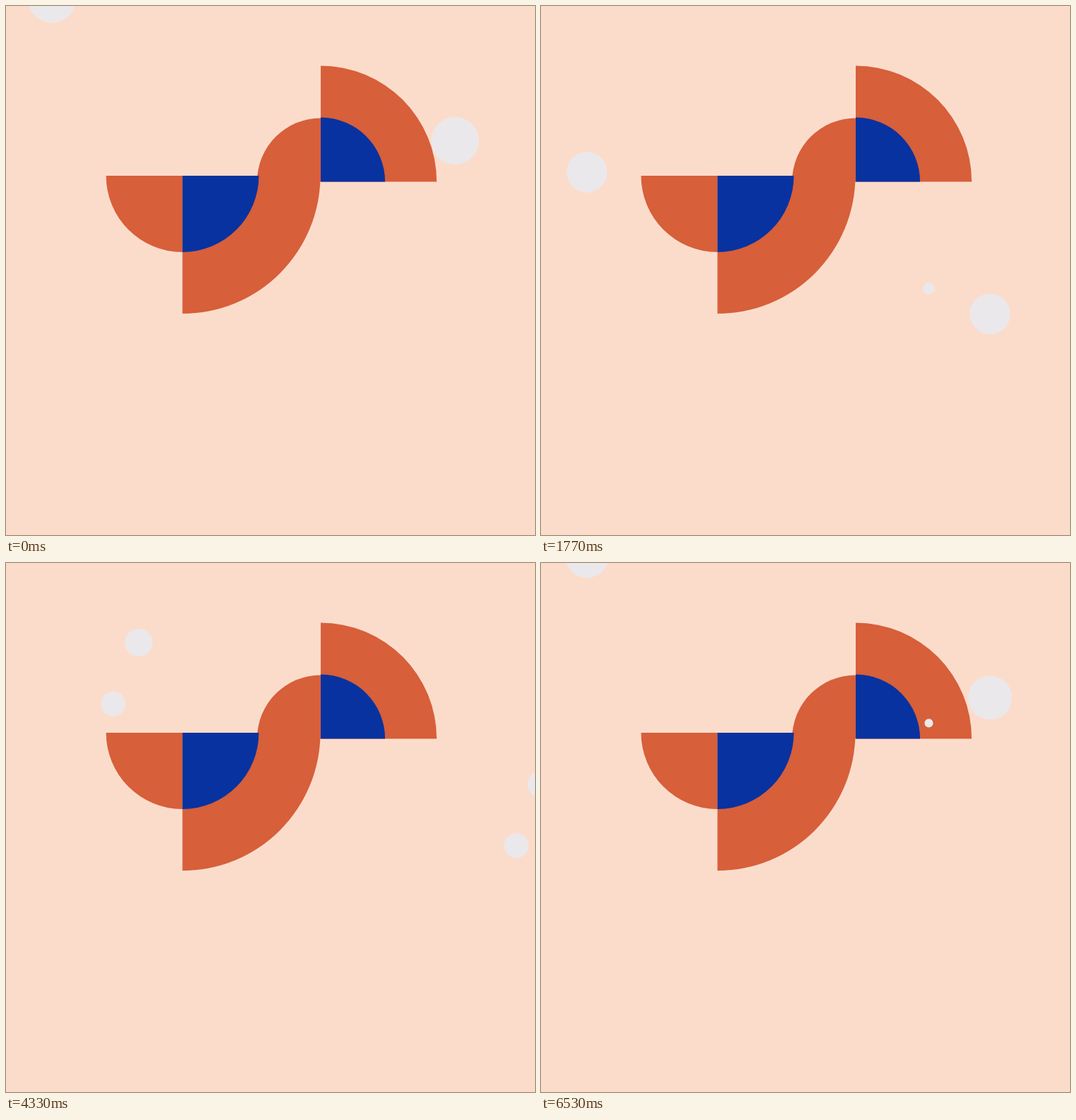
An HTML page with a canvas for the animation above (6560 ms loop, 748 by 748 pixels).

```html
<!DOCTYPE html>
<html lang="en">
<head>
<meta charset="utf-8">
<title>Pulsing rings</title>
<style>
html, body { margin: 0; width: 100%; height: 100%; overflow: hidden; background: #fbdccb; }
canvas { display: block; width: 748px; height: 748px; }
</style>
</head>
<body>
<canvas id="stage" width="748" height="748"></canvas>
<script>
const ctx = document.getElementById('stage').getContext('2d');
const LOOP = 6560, STEP = LOOP / 16, PEAK_AT = 38, MAX_R = 37, RING_R = 122.5;
const BG = '#fbdccb', ORANGE = '#d75f3a', BLUE = '#0832a0', DOT = '#ebe8eb';
const centers = [[65, 112.5], [635, 313]];

// Wedge spanning quarter turns, counted clockwise from the right
function wedge(x, y, r, from, to, color) {
  ctx.fillStyle = color;
  ctx.beginPath();
  ctx.moveTo(x, y);
  ctx.arc(x, y, r, from * Math.PI / 2, to * Math.PI / 2);
  ctx.fill();
}

function drawShapes() {
  wedge(445, 248.5, 90, 2, 3, ORANGE);
  wedge(249.5, 240, 195, 0, 1, ORANGE);
  wedge(249.5, 240, 108, 1, 2, ORANGE);
  wedge(249.5, 240, 108, 0, 1, BLUE);
  wedge(445, 248.5, 164, 3, 4, ORANGE);
  wedge(445, 248.5, 91, 3, 4, BLUE);
}

function drawDot(index, size) {
  const angle = (index - 2) * Math.PI / 4;
  for (const [x, y] of centers) {
    wedge(x + RING_R * Math.cos(angle), y + RING_R * Math.sin(angle), MAX_R * size, 0, 4, DOT);
  }
}

function frame(now) {
  const t = now % LOOP;
  const pos = (t - PEAK_AT) / STEP;
  const step = Math.floor(pos), part = pos - step;
  ctx.fillStyle = BG;
  ctx.fillRect(0, 0, 748, 748);
  drawShapes();
  // One dot shrinks while the next one grows; the loop opens on a single dot
  if (step >= 0) drawDot(step, 1 - part);
  drawDot(step + 1, part);
  requestAnimationFrame(frame);
}
frame(0);
</script>
</body>
</html>
```
